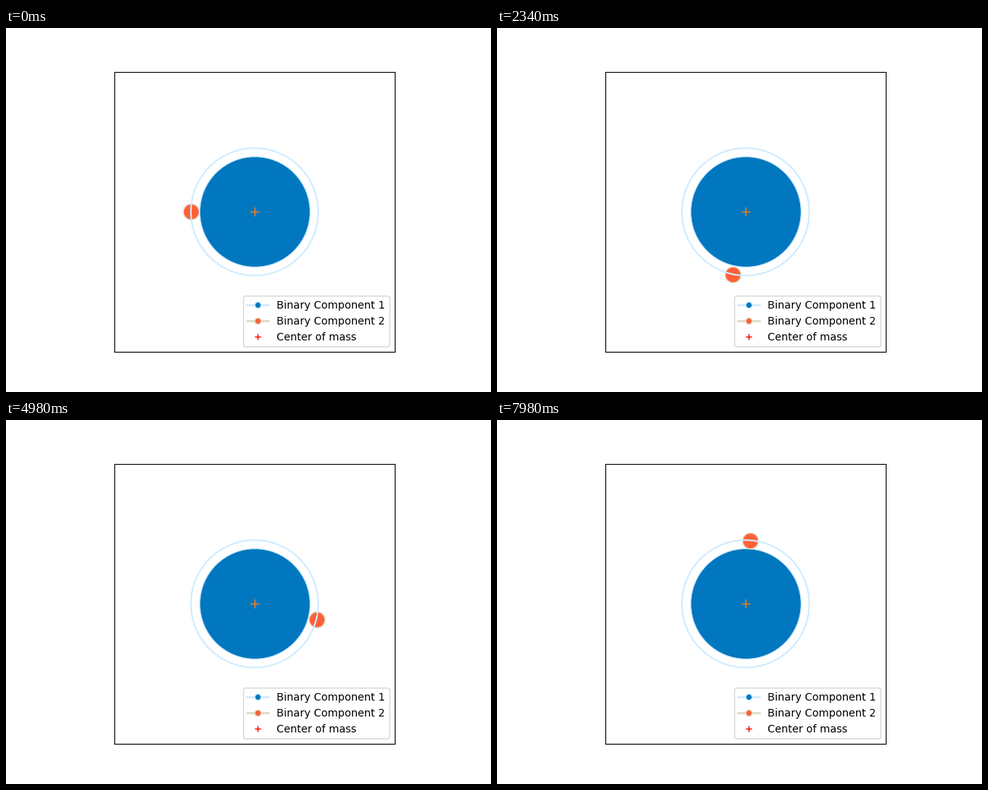
Write a matplotlib script that moves like this. It is 640 px wide and 480 px high and loops after 8 s.

```python
import numpy as np
import matplotlib.pyplot as plt
from matplotlib.animation import FuncAnimation
from matplotlib.lines import Line2D

LOOP_MS = 8000
STEPS = 267  # one degree of orbit per step

BLUE, SKY = "#0077be", "#d0ecff"
ORANGE, BONE = "#ff6037", "#e3dac9"

fig, ax = plt.subplots(figsize=(6.4, 4.8), dpi=100)
ax.set_aspect("equal")
ax.set(xlim=(-2.2, 2.2), ylim=(-2.2, 2.2), xticks=[], yticks=[])


def body(size, face, edge, z):
    """A round marker at the centre of mass."""
    return ax.plot([0], [0], "o", ms=size, mfc=face, mec=edge, mew=1, zorder=z)[0]


def key(label, face, edge):
    return Line2D([], [], color=edge, lw=2, marker="o", ms=6,
                  mfc=face, mec=edge, mew=1, label=label)


body(105, BLUE, SKY, 2)
moon = body(15, ORANGE, BONE, 3)

turn = np.linspace(0, 2 * np.pi, 361)
ax.plot(np.cos(turn), np.sin(turn), color=SKY, lw=1.5, zorder=4)
ax.plot([0], [0], "+", color="#ff7f0e", ms=8.5, mew=1, zorder=5)

ax.legend(
    handles=[
        key("Binary Component 1", BLUE, SKY),
        key("Binary Component 2", ORANGE, BONE),
        Line2D([], [], color="red", ls="none", marker="+", ms=6,
               label="Center of mass"),
    ],
    loc="lower right",
)


def update(step):
    angle = np.radians(180 + step)
    moon.set_data([np.cos(angle)], [np.sin(angle)])
    return [moon]


anim = FuncAnimation(fig, update, frames=STEPS, interval=LOOP_MS / STEPS,
                     init_func=lambda: update(0), repeat=True, repeat_delay=0)
plt.show()
```
